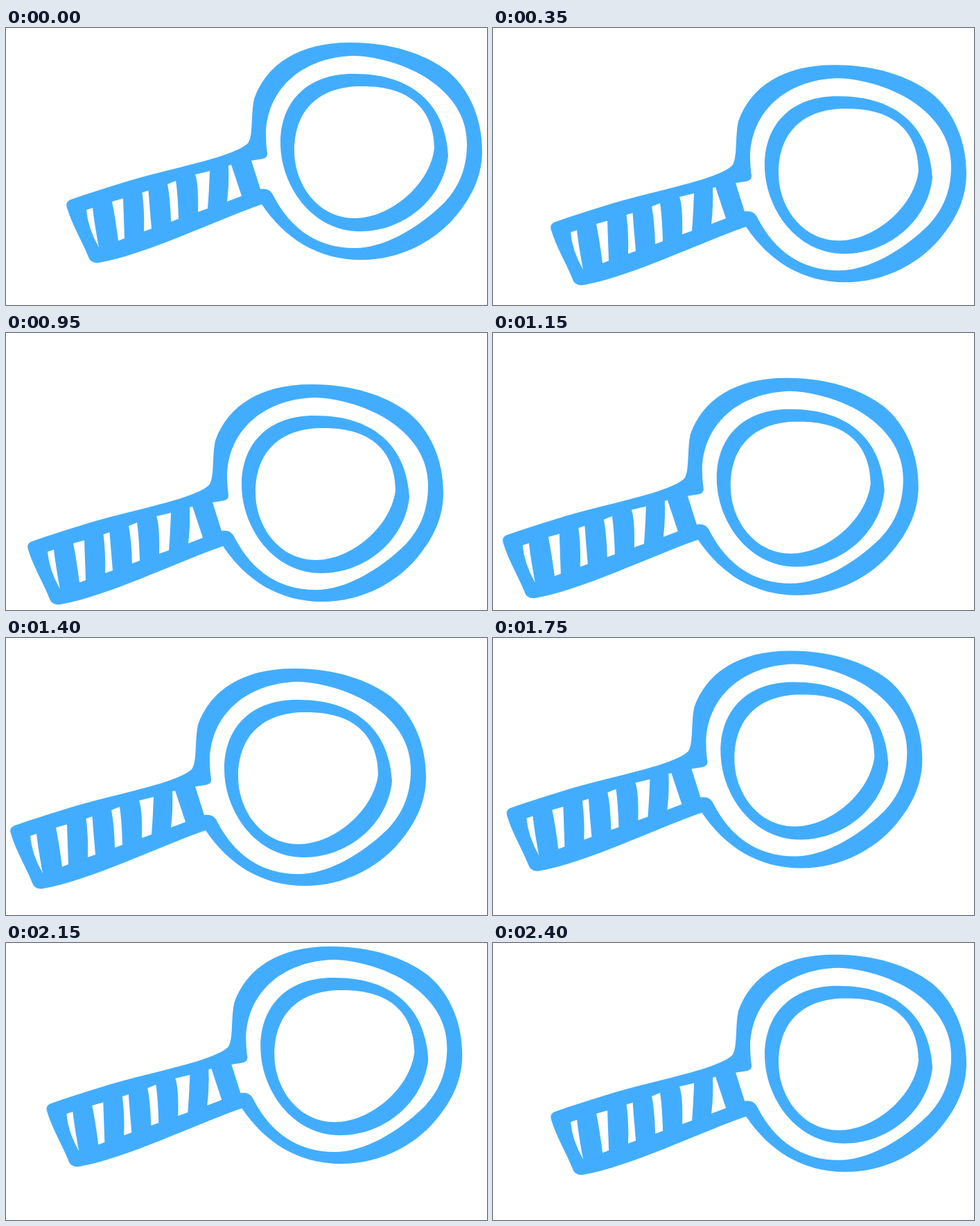
Animation of 694 by 399 pixels, one loop 2450 ms. Source, as an HTML page with a canvas:

```html
<!DOCTYPE html>
<html lang="en">
<head>
<meta charset="utf-8">
<title>Searching</title>
<style>
  html, body { margin: 0; width: 100%; height: 100%; overflow: hidden; background: #fff; }
  canvas { display: block; }
</style>
</head>
<body>
<canvas id="stage" width="694" height="399"></canvas>
<script>
const ctx = document.getElementById('stage').getContext('2d');
const LOOP = 2450;
const STEP = 50;

const outline = `M499 21C555 21 604 37 637 62C668 87 687 130 687 177
  C687 208 676 236 656 262C624 306 570 334 512 334C450 334 402 303 369 254
  C300 278 200 327 134 338C127 339 121 336 119 330C111 309 95 283 88 259
  C86 253 88 249 94 247C140 231 185 217 230 206C285 192 333 181 349 166
  C357 156 353 125 358 102C376 51 425 20 499 21Z`;
const rimGap = `M502 40C552 42 604 63 633 93C655 115 665 140 665 167
  C665 203 653 230 632 252C594 289 545 317 503 317C450 317 411 290 386 242
  C382 233 376 231 367 232L354 191L370 188.5Q377 187 377 181
  Q375 168 375 155C375 90 425 42 502 40Z`;
const lensRim = `M500 66C588 65 634 112 638 183C632 245 575 293 511 293
  C440 293 396 225 396 166C396 103 438 66 500 66Z`;
const lens = `M512 84C582 83 617 116 618 173C612 225 555 274 503 274
  C450 274 416 225 416 177C416 115 455 84 512 84Z`;
const slits = `M116 262L125 259Q128 285 134 316Q118 288 116 262Z
  M153 250L169 245.5Q170 275 171 303L162 306.5Q158 275 153 250Z
  M196.5 237L205.5 234Q207 255 210 289L199 293Q200 263 196.5 237Z
  M233 225L245 220Q248 240 249 275L238 279Q237 245 233 225Z
  M273 211L294 206Q293 235 291 260L277 265Q278 225 273 211Z
  M321 198L325 197L340 242L319 250Q322 225 321 198Z`;
const glass = new Path2D(outline + rimGap + lensRim + lens + slits);

// Knots of the wandering path: time, x, y.
const knots = [
  [0, 0, 0], [130, 2.1, 12.3], [350, -4, 32.2], [550, -18.2, 46],
  [950, -56, 53], [1100, -69.8, 46.8], [1400, -81, 23], [1650, -74, 4],
  [1750, -67.6, -2.5], [2150, -28.7, -16], [2200, -23.8, -15], [2400, -3.9, -4.2]
];

function knot(i) {
  const n = knots.length;
  const [t, x, y] = knots[(i + n) % n];
  return [t + Math.floor(i / n) * LOOP, x, y];
}

// Slope of the parabola through a knot and its neighbours.
function slope(i, axis) {
  const a = knot(i - 1), b = knot(i), c = knot(i + 1);
  const before = b[0] - a[0], after = c[0] - b[0];
  return ((b[axis] - a[axis]) / before * after +
          (c[axis] - b[axis]) / after * before) / (before + after);
}

function position(t, axis) {
  let i = 0;
  while (knot(i + 1)[0] <= t) i++;
  const a = knot(i), b = knot(i + 1);
  const span = b[0] - a[0], u = (t - a[0]) / span, v = 1 - u;
  return v * v * ((1 + 2 * u) * a[axis] + u * span * slope(i, axis)) +
         u * u * ((1 + 2 * v) * b[axis] - v * span * slope(i + 1, axis));
}

function draw(t) {
  ctx.setTransform(1, 0, 0, 1, 0, 0);
  ctx.fillStyle = '#fff';
  ctx.fillRect(0, 0, 694, 399);
  ctx.translate(position(t, 1), position(t, 2));
  ctx.fillStyle = '#42adff';
  ctx.fill(glass, 'evenodd');
}

const start = performance.now();
function tick(now) {
  const t = Math.max(0, now - start) % LOOP;
  draw(Math.floor(t / STEP) * STEP);
  requestAnimationFrame(tick);
}
draw(0);
requestAnimationFrame(tick);
</script>
</body>
</html>
```
